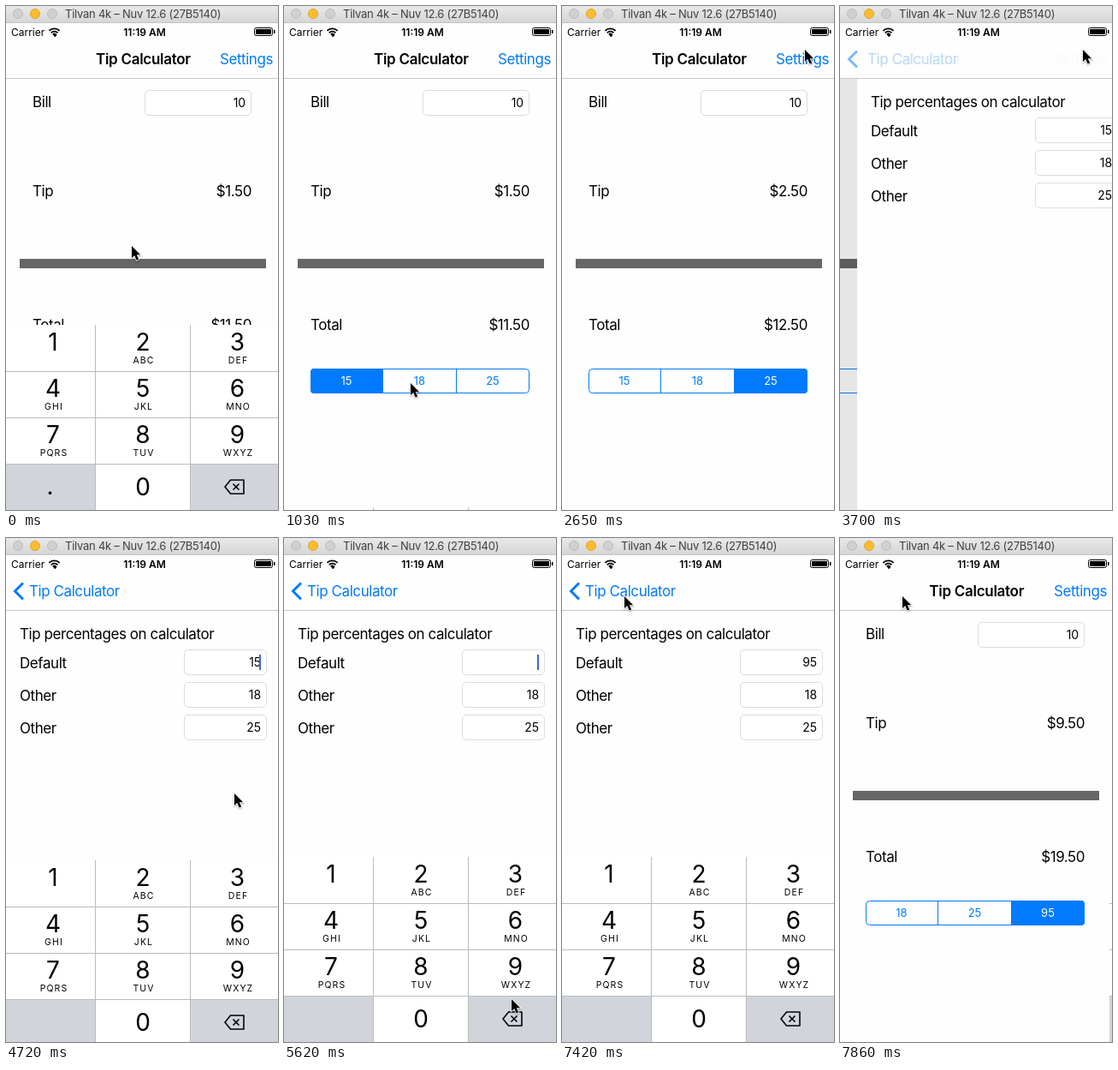
These frames come from a looping animation (318 by 588 pixels, 8000 ms). An HTML page with a canvas:

```html
<!DOCTYPE html>
<html lang="en">
<head>
<meta charset="utf-8">
<title>Tip Calculator</title>
<style>
  html, body { margin: 0; width: 318px; height: 588px; overflow: hidden; background: #fefefe; }
  canvas { display: block; }
</style>
</head>
<body>
<canvas id="stage" width="318" height="588"></canvas>
<script>
const W = 318, H = 588, LOOP = 8000;
const PAPER = '#fefefe', BLUE = '#007aff', KEY_GREY = '#d1d5db';
const PUSH = 3518, POP = 7590;
const g = document.getElementById('stage').getContext('2d');

const clamp = v => Math.max(0, Math.min(1, v));
const mix = (a, b, k) => a + (b - a) * k;

// Critically damped spring: 1 at the start, settling to 0
function settle(ms) {
  const x = Math.max(0, ms) * 0.025;
  return (1 + x) * Math.exp(-x);
}

function recordedTime(t) {
  if (t < 290) return 0;
  if (t < 2640) return 300 + Math.floor((t - 300) / 147 + 0.1) * 147;
  if (t < 3240) return 2650;
  return 3250 + Math.min(31, Math.floor((t - 3250) / 148.7 + 0.15)) * 148.7;
}

// Value of the last [time, value] entry that has been reached
const latest = (steps, t) => steps.filter(s => t >= s[0]).pop()[1];

function rect(x, y, w, h, color) {
  g.fillStyle = color;
  g.fillRect(x, y, w, h);
}

function text(str, x, y, { size = 17, weight = 400, color = '#000', align = 'left', spacing = 0 } = {}) {
  g.font = `${weight} ${size}px Inter, "Liberation Sans", sans-serif`;
  g.letterSpacing = spacing + 'px';
  g.textAlign = align;
  g.fillStyle = color;
  g.fillText(str, x, y);
}

const label = (str, x, y, options) => text(str, x, y, { spacing: -0.43, ...options });

function roundBox(x, y, w, h, r, stroke, fill) {
  g.beginPath();
  g.roundRect(x + 0.5, y + 0.5, w - 1, h - 1, r);
  if (fill) { g.fillStyle = fill; g.fill(); }
  g.strokeStyle = stroke;
  g.lineWidth = 1;
  g.stroke();
}

function line(points, width, color = '#000', closed = false) {
  g.beginPath();
  points.forEach(([x, y]) => g.lineTo(x, y));
  if (closed) g.closePath();
  g.strokeStyle = color;
  g.lineWidth = width;
  g.stroke();
}

function faded(alpha, paint) {
  if (alpha <= 0) return;
  g.globalAlpha = alpha;
  paint();
  g.globalAlpha = 1;
}

function shifted(x, y, paint) {
  g.save();
  g.translate(x, y);
  paint();
  g.restore();
}

function inputField(value, x, y, w) {
  roundBox(x, y, w, 30, 4.5, '#dcdcdc', '#fff');
  text(value, x + w - 7, y + 20, { size: 14, align: 'right', spacing: -0.1 });
}

function windowBar() {
  const shade = g.createLinearGradient(0, 0, 0, 20);
  shade.addColorStop(0, '#e9e9e9');
  shade.addColorStop(1, '#d5d5d5');
  rect(0, 0, W, 20, shade);
  rect(0, 19, W, 1, '#c4c4c4');
  ['#d0d0d0', '#fdbd2e', '#d0d0d0'].forEach((color, i) => {
    g.beginPath();
    g.arc(14 + 20 * i, 9, 5.5, 0, 7);
    g.fillStyle = color;
    g.fill();
    g.strokeStyle = i === 1 ? '#e2a32a' : '#bdbdbd';
    g.lineWidth = 1;
    g.stroke();
  });
  text('Tilvan 4k – Nuv 12.6 (27B5140)', 69, 14, { size: 13, color: '#404040', spacing: -0.25 });
}

function statusBar() {
  text('Carrier', 6, 35, { size: 12 });
  for (const r of [2, 5.3, 8.6]) {
    g.beginPath();
    g.arc(56.5, 35, r, -2.36, -0.78);
    if (r === 2) g.lineTo(56.5, 35.5);
    g.strokeStyle = '#000';
    g.lineWidth = r === 2 ? 2.5 : 1.8;
    g.stroke();
  }
  text('11:19 AM', 162, 35, { size: 12, weight: 600, align: 'center' });
  roundBox(290, 25, 22, 10, 2, '#000');
  rect(292, 27, 18, 6, '#000');
  rect(313, 28, 1.5, 4, '#000');
}

function navBar(t, slide) {
  rect(0, 20, W, 64, PAPER);
  rect(0, 84, W, 1, '#c6c6c6');
  const back = t < POP ? clamp((t - PUSH) / 350) : 1 - clamp((t - POP) / 250);
  const root = 1 - 1.9 * back;
  const titleX = mix(27, 105, slide);
  const settingsDim = t >= 3240 && t < PUSH ? 0.3 : 1;
  const backDim = t >= 7550 ? 0.3 : 1;
  faded(root, () => text('Tip Calculator', titleX, 68, { weight: 600, spacing: -0.28 }));
  faded(root * settingsDim, () => label('Settings', 312, 68, { align: 'right', color: BLUE }));
  faded(back * back * backDim, () => label('Tip Calculator', titleX, 68, { color: BLUE }));
  faded(back * backDim, () => line([[20, 52.5], [10.5, 62], [20, 71.5]], 3, BLUE));
}

function segments(rates, selected) {
  const edges = [31, 115.5, 201.5, 287];
  g.save();
  g.beginPath();
  g.roundRect(31, 423, 256, 29, 4);
  g.clip();
  rect(edges[selected], 423, edges[selected + 1] - edges[selected], 29, BLUE);
  g.restore();
  roundBox(31, 423, 256, 29, 4, BLUE);
  for (const x of [115, 201]) rect(x, 423, 1, 29, BLUE);
  rates.forEach((rate, i) => text(rate, [73, 158.5, 244][i], 442,
    { size: 13, align: 'center', color: i === selected ? '#fff' : BLUE }));
}

function calculator(t) {
  const rates = t < 5000 ? [15, 18, 25] : [18, 25, 95];
  const selected = latest([[0, 0], [1310, 1], [1900, 2]], t);
  const bill = 10, tip = bill * rates[selected] / 100;
  rect(0, 85, W, H, PAPER);
  label('Bill', 31, 118);
  inputField(bill, 162, 98, 125);
  label('Tip', 31, 222);
  label('$' + tip.toFixed(2), 287, 222, { align: 'right' });
  rect(16, 295, 288, 11, '#666');
  label('Total', 31, 378);
  label('$' + (bill + tip).toFixed(2), 287, 378, { align: 'right' });
  segments(rates, selected);
}

function settings(t) {
  const first = latest([[0, '15'], [5160, '1'], [5310, ''], [5900, '9'], [6350, '95']], t);
  rect(0, 85, W, H, PAPER);
  label('Tip percentages on calculator', 16, 118);
  [['Default', first], ['Other', '18'], ['Other', '25']].forEach(([name, value], i) => {
    label(name, 16, 152 + 38 * i);
    inputField(value, 208, 130 + 38 * i, 97);
  });
  if (t >= 4425 && t < POP && (t - 4430) % 1000 < 600) rect(296, 136, 2, 18, '#4264e6');
}

const LETTERS = ['', 'ABC', 'DEF', 'GHI', 'JKL', 'MNO', 'PQRS', 'TUV', 'WXYZ'];
const COLUMNS = [0, 105, 216, W], CENTERS = [55, 160, 270.5];

function keypad(decimal, pressed) {
  for (let i = 0; i < 12; i++) {
    const col = i % 3, y = 372 + 54 * Math.floor(i / 3), mid = CENTERS[col];
    const grey = (i === 9 || i === 11) !== (i === pressed);
    rect(COLUMNS[col], y, COLUMNS[col + 1] - COLUMNS[col], 54, grey ? KEY_GREY : '#fff');
    if (i < 9) {
      text(i + 1, mid, y + 30, { size: 28, align: 'center' });
      text(LETTERS[i], mid + 1, y + 45, { size: 10.5, align: 'center', spacing: 1.1 });
    }
  }
  text('0', 160, 571, { size: 28, align: 'center' });
  if (decimal) text('.', 51.5, 570, { size: 28, align: 'center' });
  g.lineJoin = 'round';
  line([[256, 561], [262.5, 553], [278, 553], [278, 569], [262.5, 569]], 1.6, '#000', true);
  line([[265.5, 557.5], [272.5, 564.5]], 1.6);
  line([[272.5, 557.5], [265.5, 564.5]], 1.6);
  g.lineJoin = 'miter';
  for (const x of [104, 215]) rect(x, 372, 1, 216, '#b9bbbe');
  for (const y of [426, 480, 534]) rect(0, y, W, 1, '#b9bbbe');
}

const PATH = [
  [0, 147, 280], [740, 147, 284], [1035, 148, 440], [1320, 158, 439], [1470, 160, 439],
  [1760, 243, 438], [2050, 244, 437], [2500, 282, 59], [2650, 284, 51], [3800, 284, 51],
  [4270, 271, 138], [4440, 270, 141], [4737, 267, 298], [5040, 266, 551], [5490, 265, 551],
  [5920, 271, 500], [6060, 270, 499], [6373, 172, 456], [6521, 176, 458], [6670, 175, 457],
  [7420, 73, 68], [LOOP, 73, 68]
];

function pointer(t) {
  const i = PATH.findIndex(p => p[0] > t);
  const [t0, x0, y0] = PATH[i - 1], [t1, x1, y1] = PATH[i];
  const u = (t - t0) / (t1 - t0), k = u * u * (3 - 2 * u);
  shifted(Math.round(mix(x0, x1, k)), Math.round(mix(y0, y1, k)), () => {
    const arrow = new Path2D('M0 0V14L3.2 11 5.6 16.5 8.2 15.4 5.8 10.2H10.2Z');
    g.shadowColor = 'rgba(0,0,0,.35)';
    g.shadowBlur = 2;
    g.shadowOffsetY = 1;
    g.lineWidth = 1.6;
    g.strokeStyle = '#fff';
    g.stroke(arrow);
    g.shadowColor = 'transparent';
    g.fillStyle = '#000';
    g.fill(arrow);
  });
}

function draw(t) {
  // 1 while the calculator is in front, 0 while the settings are
  const slide = t < POP ? settle(t - PUSH) : 1 - settle(t - POP);
  const hidden = 216 * (1 - settle(t - 790));
  const raised = 216 * settle(t - 4501);
  const pressed = latest([[0, -1], [5160, 11], [5400, -1], [5900, 8], [6000, -1], [6350, 4], [6450, -1]], t);

  rect(0, 0, W, H, PAPER);
  shifted(-Math.round(0.3 * W * (1 - slide)), 0, () => calculator(t));
  if (slide < 1) {
    rect(0, 85, W, H, `rgba(0,0,0,${0.1 * (1 - slide)})`);
    shifted(Math.round(W * slide), 0, () => {
      settings(t);
      if (t > 4501) shifted(0, Math.round(raised), () => keypad(false, pressed));
    });
  }
  if (t < 1300) shifted(0, Math.round(hidden), () => keypad(true, -1));
  navBar(t, slide);
  statusBar();
  windowBar();
  pointer(t);
}

const start = performance.now();
function tick() {
  draw(recordedTime((performance.now() - start) % LOOP));
  requestAnimationFrame(tick);
}
tick();
</script>
</body>
</html>
```
